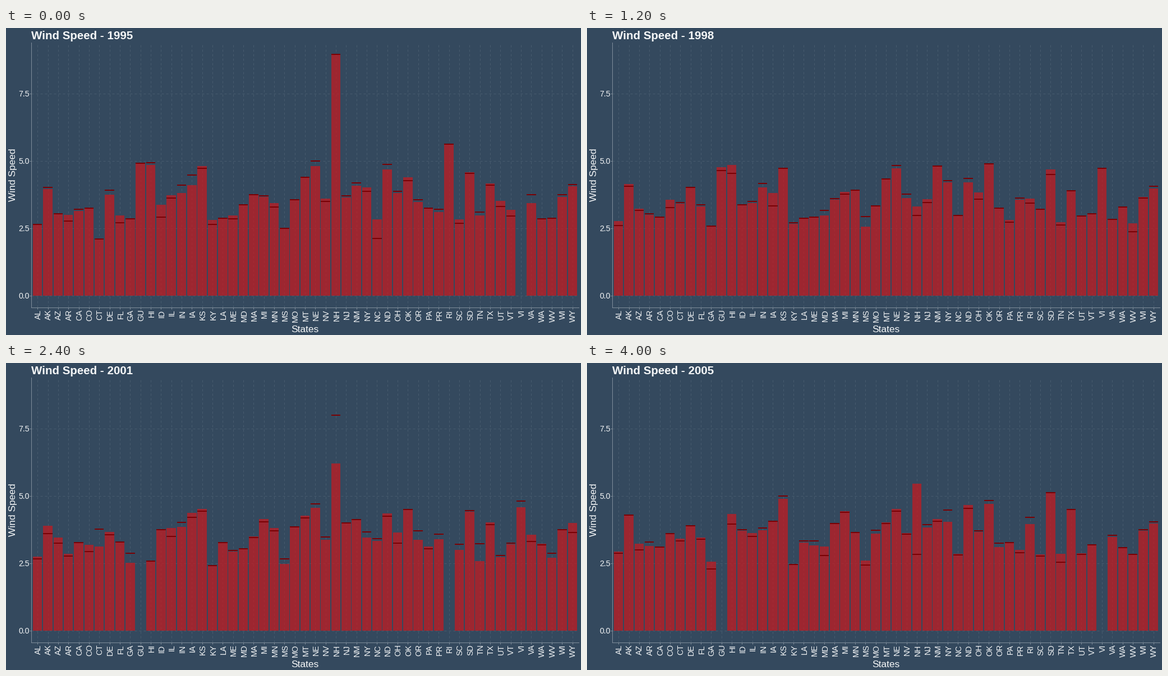
A matplotlib script for the animation above (4.4 s loop, 1025x547 px).

```python
import numpy as np
import matplotlib.pyplot as plt
from matplotlib.animation import FuncAnimation

W, H = 1025, 547
LEFT, RIGHT, TOP, BOTTOM = 45.2, 1020.8, 26, 498
ZERO, UNIT = 477, 48  # pixel row of zero, pixels per unit of speed
PX = 0.72  # points per pixel at 100 dpi
BG, GRID, AXIS, INK = "#34495E", "#475B6E", "#7F8D9A", "#F4F6F7"
BAR, MARK = "#CB181D", "#7A0004"
FIRST, YEARS = 1995, 11

STATES = ("AL AK AZ AR CA CO CT DE FL GA GU HI ID IL IN IA KS KY LA ME MD MA MI "
          "MN MS MO MT NE NV NH NJ NM NY NC ND OH OK OR PA PR RI SC SD TN TX UT "
          "VT VI VA WA WV WI WY").split()
N = len(STATES)

# Typical wind speed of each group of states.
LEVELS = {
    2.7: "AL GA KY MS TN WV",
    3.1: "AR AZ CA LA MD ME NC PA PR SC UT VA VT WA",
    3.45: "CO CT FL ID MO NH NV OR",
    3.8: "DE IL IN MA MI MN NJ NY OH RI WI",
    4.15: "AK IA MT NM TX WY",
    4.7: "GU HI KS ND NE OK SD VI",
}
BASE = {state: level for level, group in LEVELS.items() for state in group.split()}

# States without readings.
GAPS = {1995: "VI", 1996: "VI", 1997: "PR RI VI", 1999: "DE", 2001: "GU RI",
        2002: "DE PR VI", 2003: "DE GU HI PR RI VT VI", 2004: "PR", 2005: "GU VI"}

# Unusual years: mean and median.
EXTREMES = {
    (1995, "NH"): (8.95, 8.95), (1995, "RI"): (5.61, 5.62), (1995, "CT"): (2.1, 2.1),
    (1997, "GU"): (6.02, 6.03), (1997, "HI"): (5.55, 5.56), (1997, "DE"): (4.95, 4.96),
    (1999, "GU"): (2.65, 2.65), (2001, "HI"): (2.58, 2.59), (2001, "NH"): (6.21, 8.0),
    (2002, "NH"): (7.29, 2.91), (2002, "GU"): (5.85, 5.87), (2002, "HI"): (5.53, 5.56),
    (2005, "NH"): (5.46, 2.83),
}


def readings(year):
    """Mean and median speed of every state, NaN where there is none."""
    rng = np.random.default_rng(year)
    mean = np.array([BASE[s] for s in STATES]) + rng.normal(0, 0.2, N)
    median = mean + rng.normal(0, 0.3, N) * rng.random(N)
    for (when, state), pair in EXTREMES.items():
        if when == year:
            i = STATES.index(state)
            mean[i], median[i] = pair
    for state in GAPS.get(year, "").split():
        i = STATES.index(state)
        mean[i] = median[i] = np.nan
    return mean, median


fig = plt.figure(figsize=(W / 100, H / 100), dpi=100, facecolor=BG)
ax = fig.add_axes([LEFT / W, 1 - BOTTOM / H, (RIGHT - LEFT) / W, (BOTTOM - TOP) / H],
                  facecolor=BG)
ax.set(xlim=(-0.6, N - 0.4), ylim=((ZERO - BOTTOM) / UNIT, (ZERO - TOP) / UNIT),
       xticks=range(N), yticks=np.arange(0, 8, 2.5))
ax.set_axisbelow(True)
ax.grid(color=GRID, linewidth=PX, linestyle=(0, (4, 4)))
ax.tick_params(length=3 * PX, width=PX, color=AXIS, labelleft=False, labelbottom=False)
ax.spines[["top", "right"]].set_visible(False)
for side in ("left", "bottom"):
    ax.spines[side].set(color=AXIS, linewidth=PX)


def label(x, y, s, size, **kw):
    """Text whose baseline anchor is given in pixels from the top left."""
    return fig.text(x / W, 1 - y / H, s, fontsize=size * PX, color=INK,
                    family="Liberation Sans", va="baseline",
                    rotation_mode="anchor", **kw)


title = label(45, 20, "", 20.5, weight="bold")
label(533, 542, "States", 17.4, ha="center")
label(17.5, 261.5, "Wind Speed", 17.4, ha="center", rotation=90)
for v in ax.get_yticks():
    label(41.5, ZERO - v * UNIT + 5, f"{v:.1f}", 14, ha="right")
step = (RIGHT - LEFT) / (N + 0.2)
for i, name in enumerate(STATES):
    label(LEFT + (i + 0.6) * step + 5.5, 501.5, name, 14, ha="right", rotation=90)

bars = ax.bar(range(N), np.zeros(N), width=0.9, color=BAR, alpha=0.7, linewidth=0)
mark_x = np.ravel([(i - 0.45, i + 0.45, np.nan) for i in range(N)])
marks, = ax.plot(mark_x, np.zeros(3 * N), color=MARK, linewidth=2 * PX,
                 solid_capstyle="butt", zorder=3)


def draw(frame):
    year = FIRST + frame
    mean, median = readings(year)
    title.set_text(f"Wind Speed - {year}")
    for bar, h in zip(bars, np.nan_to_num(mean)):
        bar.set_height(h)
    marks.set_ydata(np.repeat(median, 3))
    return [title, marks, *bars]


anim = FuncAnimation(fig, draw, frames=YEARS, interval=400, repeat=True, blit=False)
plt.show()
```
